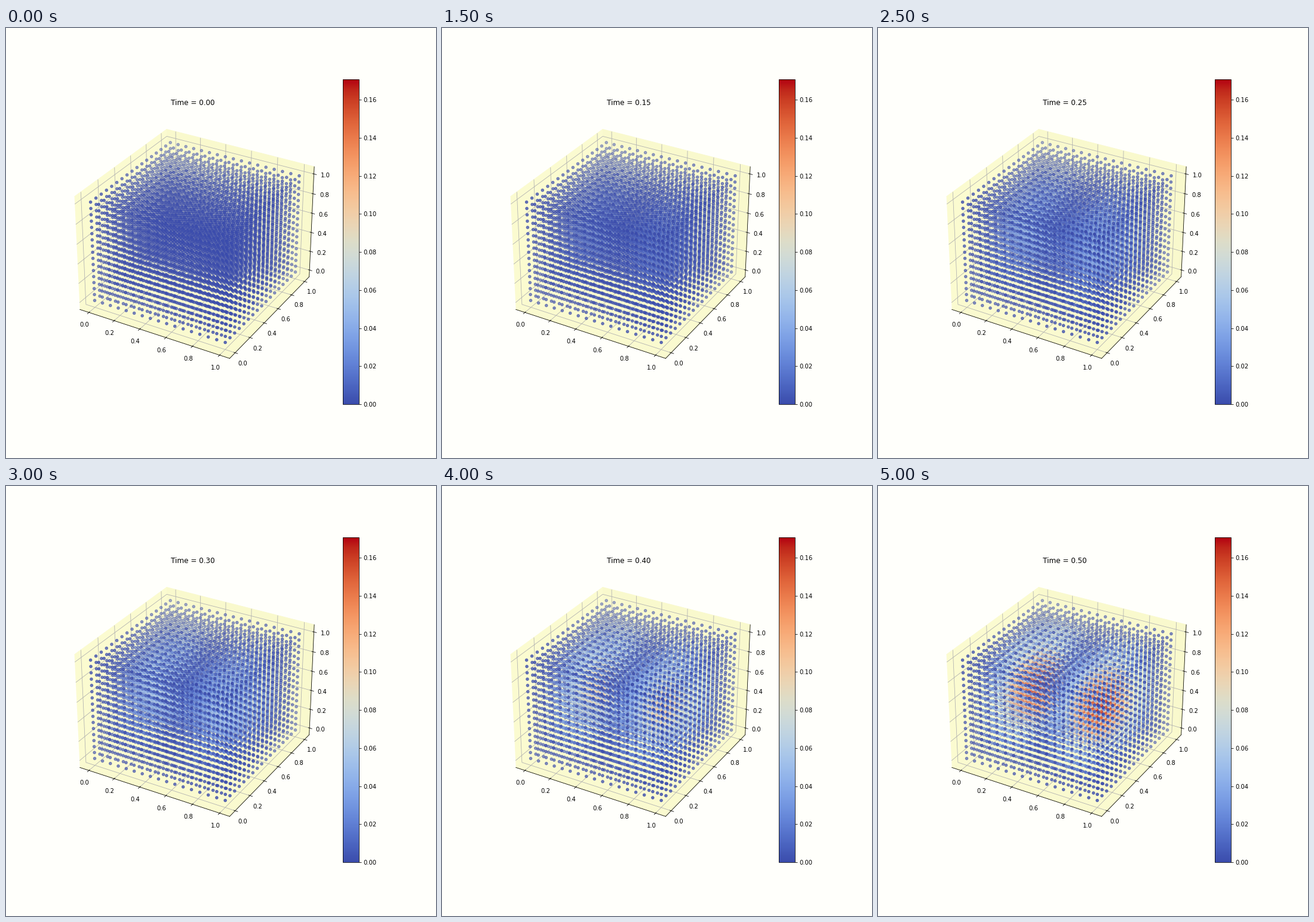
Animation of 720 by 720 pixels, one loop 5250 ms. Source, as a matplotlib script:

```python
import numpy as np
import matplotlib as mpl
import matplotlib.pyplot as plt
from matplotlib.animation import FuncAnimation
from matplotlib.colors import ListedColormap

FRAMES, INTERVAL = 21, 250
DT = 0.025
CELLS = 16
PEAK = 0.1706
PAPER = "#fffffb"

plt.rcParams.update({
    "figure.dpi": 72,
    "font.size": 10,
    "font.family": "DejaVu Sans",
    "figure.subplot.bottom": 0.125,
    "figure.facecolor": PAPER,
    "axes.facecolor": PAPER,
})


def warm_map():
    """Coolwarm with a slightly weaker blue channel."""
    rgba = mpl.colormaps["coolwarm"](np.linspace(0, 1, 256))
    rgba[:, 2] = np.clip(rgba[:, 2] - 0.08, 0, 1)
    return ListedColormap(rgba)


axis = np.linspace(0, 1, CELLS + 1)
x, y, z = (g.ravel() for g in np.meshgrid(axis, axis, axis, indexing="ij"))
mode = np.abs(np.sin(2 * np.pi * x)) * np.sin(np.pi * y) * np.sin(np.pi * z)
t_end = (FRAMES - 1) * DT


def field(t):
    return PEAK * (t / t_end) ** 2 * mode


fig = plt.figure(figsize=(10, 10))
ax = fig.add_subplot(111, projection="3d")
dots = ax.scatter(x, y, z, c=field(0), cmap=warm_map(), vmin=0, vmax=PEAK)
fig.colorbar(dots, ax=ax)

for side, shade in ((ax.xaxis, 0.985), (ax.yaxis, 0.975), (ax.zaxis, 0.98)):
    side.set_pane_color((shade, shade, shade - 0.17, 1))


def update(i):
    t = i * DT
    dots.set_array(field(t))
    ax.set_title(f"Time = {t:.2f}")
    return (dots,)


anim = FuncAnimation(fig, update, frames=FRAMES, interval=INTERVAL,
                     repeat=True, repeat_delay=0, blit=False)
plt.show()
```
